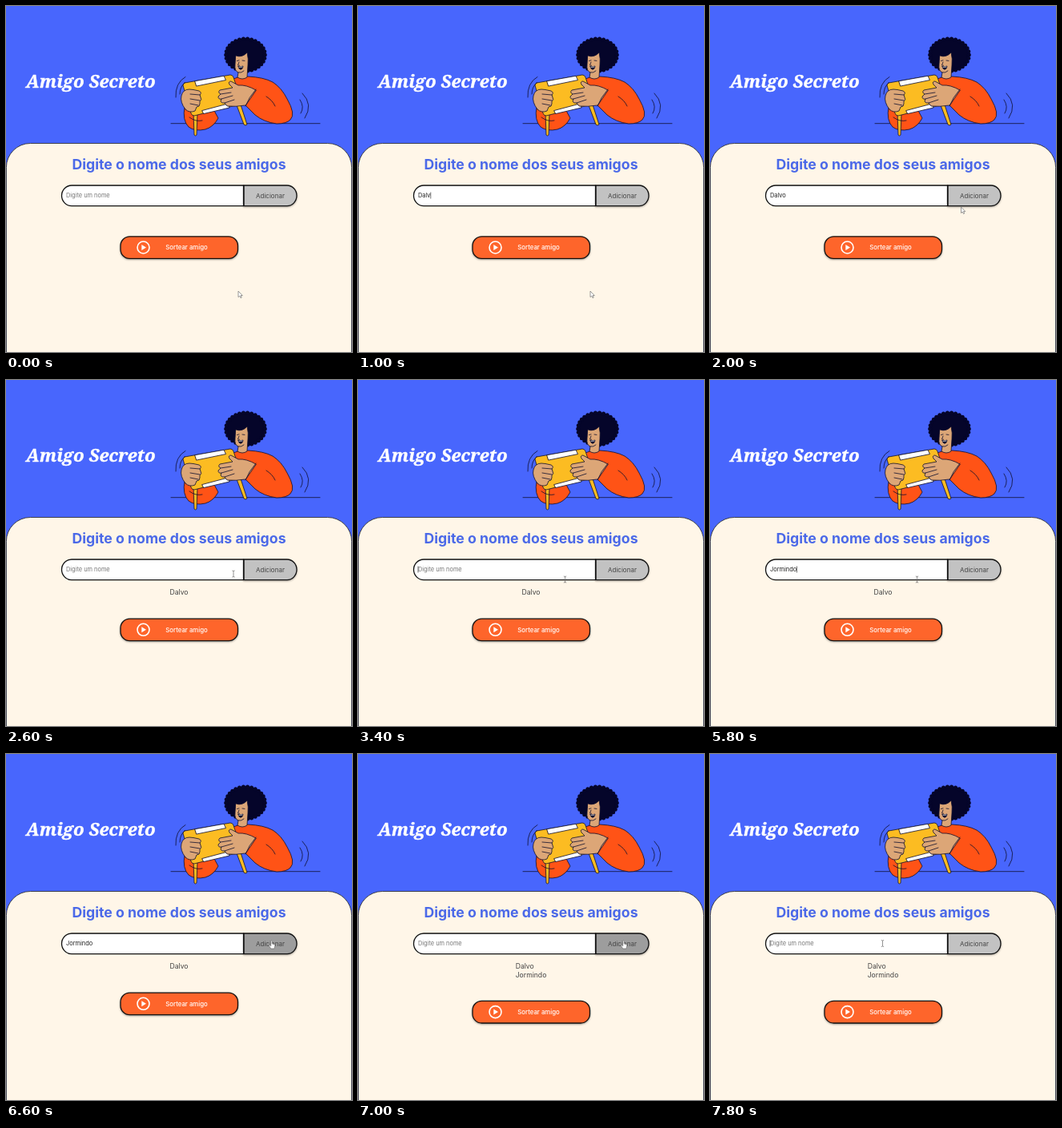
Write an HTML page that moves like this. It is 432 by 432 pixels and loops after 8000 ms.

```html
<!DOCTYPE html>
<html lang="pt-BR">
<head>
<meta charset="utf-8">
<title>Amigo Secreto</title>
<style>
  html, body { margin: 0; width: 100%; height: 100%; overflow: hidden; background: #4866fd; }
  svg { display: block; width: 100%; height: 100%; }
  text { font-family: Inter, sans-serif; }
  .title { font: italic 800 22.2px "Noto Serif", serif; fill: #fff; stroke: #fff; stroke-width: .4; }
  .heading { font-size: 17.7px; font-weight: 700; fill: #4b69e8; text-anchor: middle; }
  .field { font-size: 7.4px; fill: #222; }
  .field.empty { fill: #777; }
  .label { font-size: 8px; }
  .list { font-size: 8.64px; fill: #444; }
  .box { stroke: #111; stroke-width: 1.3; }
  .art { stroke: #10102e; stroke-width: .8; stroke-linejoin: round; stroke-linecap: round; }
  .line { fill: none; }
  .orange { fill: #ff5316; }
  .skin { fill: #dca677; }
  .yellow { fill: #fcbc22; }
  .shadow { filter: drop-shadow(0 1.4px 1.2px rgba(0, 0, 0, .35)); }
  .pointer path { fill: #fff; stroke: #707070; stroke-width: .7; stroke-linejoin: round; }
  .pointer #ibeam { fill: none; stroke: #666; }
</style>
</head>
<body>
<svg viewBox="0 0 432 432">
  <rect width="432" height="432" fill="#4866fd"/>
  <text class="title" x="25" y="102">Amigo Secreto</text>

  <g class="art">
    <path class="line" d="M206 146.700H392"/>
    <g id="hair" fill="#05052a" stroke="none"><ellipse cx="299" cy="61" rx="25" ry="21"/></g>
    <path class="orange" d="M282 93Q288 87 302 88Q322 89 333 95Q344 102 351 116Q362 135 355 142Q350 147 338 147Q322 145 311 136L297 122L270 112Z"/>
    <path class="skin" d="M287 62Q295 65 301 58Q303 66 302 74L301 89Q295 93 289 89L290 83Q285 81 286 73Z"/>
    <path class="line" d="M288.500 68.500l2.500-.7M295 68l3 .4M291 70l-1.500 4 2 .3M290 83q4 1 7-2"/>
    <path d="M290 75.500q3.500.8 6-.5-.5 4.200-3.300 4.200-2.200-.4-2.700-3.700Z" fill="#10102e"/>
    <path d="M291 76.300l4-.3" stroke="#fff"/>
    <path class="orange" d="M223 126Q220 143 228 151Q236 157 249 154Q259 151 265 140L258 127Z"/>
    <path class="yellow" d="M234 134L235 161Q236.500 163 238 161L239 134Z"/>
    <path class="yellow" d="M285 116L297 148Q299 150 301 148L290 114Z"/>
    <path class="yellow" d="M223 96L280 86Q283 86 284 89L294 119Q294 122 291 123L235 137Q232 137 231 134L221 99Q221 97 223 96Z"/>
    <path d="M236 93.700L272 87.300L274.500 92.500L238 100Z" fill="#fff"/>
    <path d="M245 130.500L277 122L279 127L247 134.500Z" fill="#fff"/>
    <path class="skin" d="M224 129Q217 120 219 112Q221 104 229 104Q233 104 241 106Q245 108 242 111L243 114Q245 117 242 119L242 122Q242 126 238 126L236 131Q229 134 224 129Z"/>
    <path class="line" d="M230 110L242 111M230 116L242 118M230 122L240 124"/>
    <path class="skin" d="M312 105Q300 98 290 99L281 94Q277 94 279 98L283 102L267 105Q264 108 268 110L265 113Q265 117 269 116L268 119Q269 122 273 121L276 125Q287 126 299 124Z"/>
    <path class="line" d="M268 110L281 108M269 116L283 112M273 121L285 117"/>
    <path class="line" d="M312 104Q303 114 299 125M325 113Q333 118 336 125M229 139Q237 145 245 143"/>
    <path class="line" d="M212 114Q211 96 224 88.500M217 110Q217 101 223 96M370 109Q384 123 373 140M367 117Q373 126 368 134"/>
  </g>

  <path d="M.4 433V201.500A30 30 0 0 1 30.400 171.500H401.600A30 30 0 0 1 431.600 201.500V433Z" fill="#fff6e8" stroke="#222" stroke-width=".8"/>
  <text class="heading" x="216" y="204">Digite o nome dos seus amigos</text>

  <g class="shadow">
    <path class="box" id="add" d="M297 224H351A12 12.800 0 0 1 351 249.600H297Z"/>
  </g>
  <path class="box" d="M296.500 224H82A12.500 12.800 0 0 0 82 249.600H296.500Z" fill="#fff"/>
  <text class="label" x="312" y="239.700" fill="#444">Adicionar</text>
  <text class="field" id="field" x="75" y="239.300"></text>
  <path id="caret" d="M0 232.500V240.500" stroke="#111" stroke-width=".6"/>

  <text class="list" y="268.200"></text>
  <text class="list" y="278.500"></text>

  <g id="draw">
    <rect class="box shadow" x="143" y="287.800" width="146.500" height="27.600" rx="11.500" fill="#fe652b"/>
    <circle cx="171.500" cy="301.500" r="7.500" fill="none" stroke="#fff" stroke-width="1.600"/>
    <path d="M169.300 298L175 301.500L169.300 305Z" fill="#fff"/>
    <text class="label" x="199.300" y="304.400" fill="#fff" font-weight="500" style="font-size: 7.800px">Sortear amigo</text>
  </g>

  <g class="pointer" id="pointer">
    <path id="arrow" d="M0 0V7.500L1.700 6L3 8.500L4.200 8L3 5.500H5.300Z"/>
    <path id="ibeam" d="M-1.600-4Q0-4 0-3Q0-4 1.600-4M0-3V3M-1.600 4Q0 4 0 3Q0 4 1.600 4"/>
    <path id="hand" d="M-.8-4.500Q0-5.500.8-4.500V-1L3.500-.4Q4.500 0 4.300 1.500L3.500 5H-.8L-3 1.500Q-3 .3-1.900.8L-.8 1.800Z"/>
  </g>
</svg>
<script>
const LOOP = 8000, TICK = 200;
const friends = [
  { name: 'Dalvo', typing: 400, added: 2400 },
  { name: 'Jormindo', typing: 4400, added: 6800 }
];
// start time, cursor shape, x, y
const pointerSteps = [
  [0, 'arrow', 290, 356], [1600, 'arrow', 297, 329], [1800, 'arrow', 308, 282],
  [2000, 'arrow', 313.5, 251], [2200, 'hand', 323, 240],
  [2600, 'ibeam', 284, 242], [2800, 'ibeam', 270, 246], [3000, 'ibeam', 258.5, 249],
  [6200, 'ibeam', 276, 245], [6400, 'hand', 318, 240], [6600, 'hand', 331.5, 238],
  [7200, 'ibeam', 282, 238], [7400, 'ibeam', 238, 237], [7600, 'ibeam', 215.5, 236.5]
];
const caretSpans = [[400, 1600], [3200, 3800], [4400, 6000], [7600, 8000]];

const $ = id => document.getElementById(id);
const lines = document.querySelectorAll('.list');

const PUFFS = 30;
for (let i = 0; i < PUFFS; i++) {
  const a = i * 2 * Math.PI / PUFFS;
  const puff = document.createElementNS('http://www.w3.org/2000/svg', 'circle');
  puff.setAttribute('cx', 299 + 24.3 * Math.cos(a));
  puff.setAttribute('cy', 61 + 20 * Math.sin(a));
  puff.setAttribute('r', 2.5);
  $('hair').append(puff);
}

function typedText(t) {
  const active = friends.find(f => t >= f.typing && t < f.added);
  return active ? active.name.slice(0, Math.floor((t - active.typing) / TICK) + 1) : '';
}

function render(t) {
  const text = typedText(t), field = $('field');
  field.textContent = text || 'Digite um nome';
  field.classList.toggle('empty', !text);

  const caretX = 75 + (text ? field.getComputedTextLength() + .3 : 0);
  $('caret').setAttribute('transform', `translate(${caretX})`);
  $('caret').style.display = caretSpans.some(([a, b]) => t >= a && t < b) ? '' : 'none';

  friends.forEach((f, i) => lines[i].textContent = t >= f.added ? f.name : '');
  const width = Math.max(...[...lines].map(l => l.getComputedTextLength()));
  lines.forEach(l => l.setAttribute('x', 216 - width / 2));
  const count = friends.filter(f => t >= f.added).length;
  $('draw').setAttribute('transform', `translate(0 ${count * 10.3})`);

  const [, shape, x, y] = pointerSteps.filter(s => s[0] <= t).pop();
  for (const id of ['arrow', 'ibeam', 'hand']) $(id).style.display = id === shape ? '' : 'none';
  $('pointer').setAttribute('transform', `translate(${x} ${y})`);
  $('add').setAttribute('fill', shape === 'hand' ? '#9d9d9d' : '#c2c2c2');
}

const start = performance.now();
function frame() {
  const t = (performance.now() - start) % LOOP;
  render(Math.floor(t / TICK) * TICK);
  requestAnimationFrame(frame);
}
frame();
</script>
</body>
</html>
```
